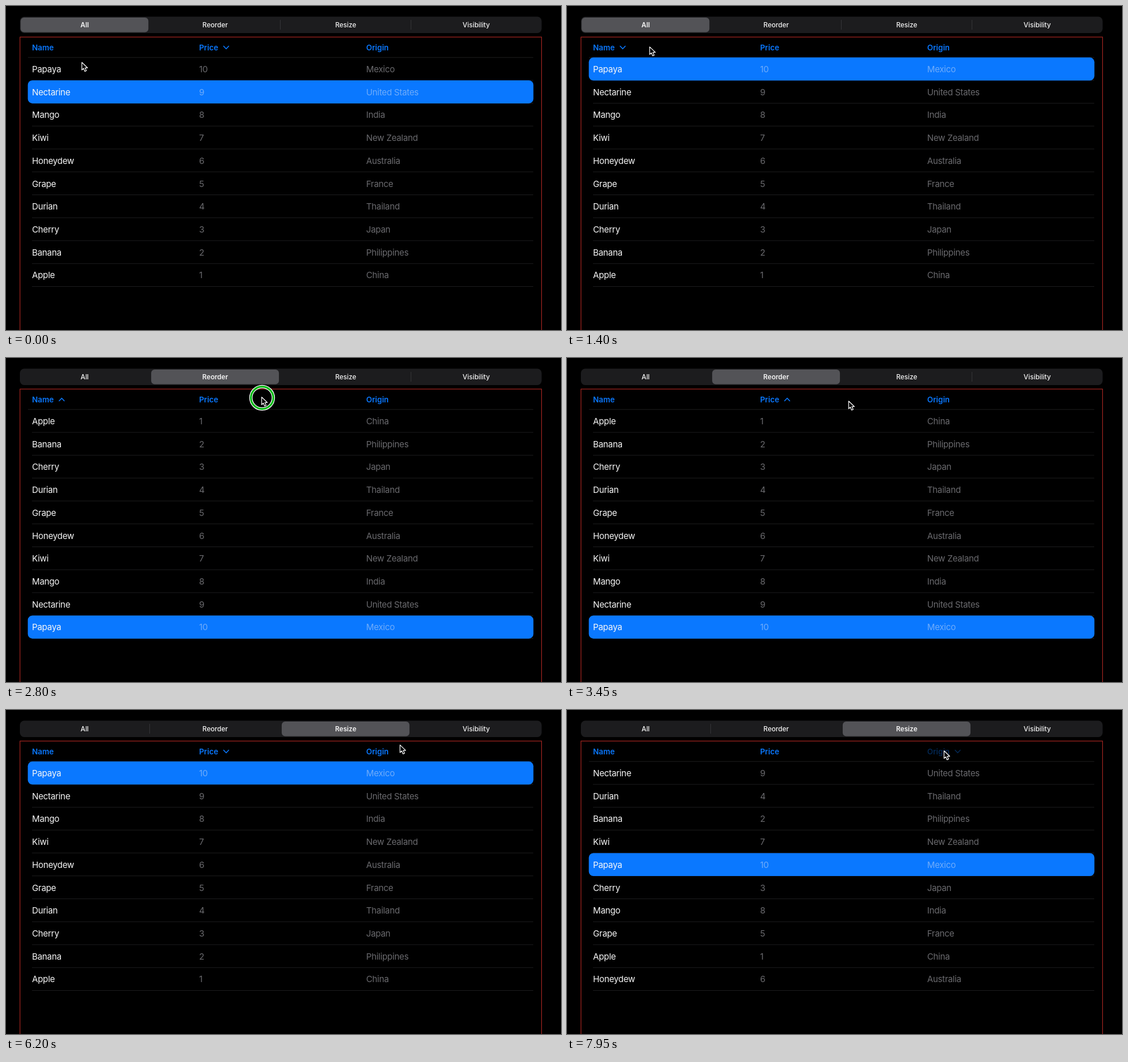
Animation, 960 px wide and 562 px high, one loop 8 s. Source, as an HTML page with a canvas:

```html
<!DOCTYPE html>
<html lang="en">
<head>
<meta charset="utf-8">
<title>Sortable table</title>
<style>
  html, body { margin: 0; width: 100%; height: 100%; overflow: hidden; background: #000; }
  canvas { display: block; width: 960px; height: 562px; }
</style>
</head>
<body>
<canvas id="stage" width="960" height="562"></canvas>
<script>
const ctx = document.getElementById('stage').getContext('2d');
const LOOP = 8000, PRESS = 150, FADE = 250;
const BLUE = '#0a78ff';
const FONT = 'Inter, Roboto, sans-serif';
const TOP = 89.7, ROW = 39.72, TAB = 225.8;

const tabs = ['All', 'Reorder', 'Resize', 'Visibility'];
const columns = ['Name', 'Price', 'Origin'];
const columnX = i => 45 + 289 * i;
const tabX = i => 136 + TAB * i;

// In order of name; the price is the rank
const origins = {
  Apple: 'China', Banana: 'Philippines', Cherry: 'Japan', Durian: 'Thailand',
  Grape: 'France', Honeydew: 'Australia', Kiwi: 'New Zealand', Mango: 'India',
  Nectarine: 'United States', Papaya: 'Mexico',
};
const fruits = Object.entries(origins).map(([name, origin], i) => [name, i + 1, origin]);

// The pointer's stops; those with an action are clicks
const stops = [
  { at: 150, x: 131, y: 97, select: 'Papaya' },
  { at: 850, x: 141, y: 71, sort: 0 },
  { at: 1500, x: 143, y: 70, sort: 0 },
  { at: 2250, x: tabX(1), y: 38, tab: 1 },
  { at: 2750, x: 442, y: 67, sort: 1 },
  { at: 3450, x: 487, y: 74 },
  { at: 3950, x: 497, y: 68, hold: 1 },
  { at: 5000, x: 538, y: 69, sort: 1 },
  { at: 5800, x: tabX(2), y: 33, tab: 2 },
  { at: 6350, x: 724, y: 72, sort: 2 },
  { at: 6750, x: 727, y: 76 },
  { at: 7700, x: 652, y: 70, hold: 2 },
];
const isClick = stop => Object.keys(stop).length > 3;

function smooth(v) {
  v = Math.max(0, Math.min(1, v));
  return v * v * (3 - 2 * v);
}

// Replays every stop up to time t
function stateAt(t) {
  const state = { ...stops[0], sort: 1, descending: true, selected: 'Nectarine', tab: 0 };
  let left = 0;
  for (const stop of stops) {
    const travel = smooth((t - left) / (stop.at - left));
    state.x += (stop.x - state.x) * travel;
    state.y += (stop.y - state.y) * travel;
    if (t < stop.at) break;
    left = stop.at + (isClick(stop) ? PRESS : 0);
    state.pressed = t < left;
    if (state.pressed) break;

    if (t < left + FADE) state.dimmed = stop.sort ?? stop.hold;
    if (stop.select) state.selected = stop.select;
    if (stop.tab) state.tab += (stop.tab - state.tab) * smooth((t - left) / FADE);
    if (stop.sort !== undefined) {
      if (stop.sort === state.sort) state.descending = !state.descending;
      state.sort = stop.sort;
    }
  }
  return state;
}

function text(string, x, y, size, weight, color, spacing = 0, align = 'left') {
  ctx.font = `${weight} ${size}px ${FONT}`;
  ctx.letterSpacing = spacing + 'px';
  ctx.textAlign = align;
  ctx.fillStyle = color;
  ctx.fillText(string, x, y);
  return ctx.measureText(string).width;
}

function box(x, y, w, h, r, color) {
  ctx.fillStyle = color;
  ctx.beginPath();
  ctx.roundRect(x, y, w, h, r);
  ctx.fill();
}

function stroke(color, width) {
  ctx.strokeStyle = color;
  ctx.lineWidth = width;
  ctx.lineCap = ctx.lineJoin = 'round';
  ctx.stroke();
}

function drawTabs(position) {
  box(24, 18.5, 902.5, 28.5, 7.5, '#1c1c1e');
  for (let i = 1; i < tabs.length; i++) {
    if (Math.abs(i - 0.5 - position) > 0.6) box(Math.floor(23 + TAB * i), 24, 1, 17, 0, '#343437');
  }
  box(25.3 + TAB * position, 20, 221, 25.5, 6, '#535357');
  tabs.forEach((label, i) => {
    const weight = Math.round(position) === i ? 600 : 500;
    text(label, tabX(i), 37, 11.6, weight, '#f4f4f4', 0, 'center');
  });
}

function drawHeader({ sort, descending, dimmed }) {
  columns.forEach((title, i) => {
    ctx.globalAlpha = dimmed === i ? 0.32 : 1;
    const end = columnX(i) + text(title, columnX(i), 76.6, 13.3, 600, BLUE);
    if (sort === i) {
      const dip = descending ? 2.3 : -2.3;
      ctx.beginPath();
      ctx.moveTo(end + 9.5, 72 - dip);
      ctx.lineTo(end + 13.8, 72 + dip);
      ctx.lineTo(end + 18.1, 72 - dip);
      stroke(BLUE, 1.6);
    }
    ctx.globalAlpha = 1;
  });
}

function drawRows({ sort, descending, selected }) {
  const rows = [...fruits].sort((a, b) => (a[sort] < b[sort] ? -1 : 1));
  if (descending) rows.reverse();
  for (let i = 0; i <= rows.length; i++) {
    const x = i ? 45 : 38;
    box(x, TOP + ROW * i - 1, 912 - x, 1, 0, '#1c1c1e');
  }
  const active = rows.findIndex(row => row[0] === selected);
  box(37.7, TOP + ROW * active - 0.4, 874.6, ROW + 0.2, 8, BLUE);
  rows.forEach((row, i) => row.forEach((value, c) => {
    const color = c ? 'rgba(235,235,245,.45)' : '#f7f7f7';
    text(value, columnX(c), 115 + ROW * i, 14.9, 400, color, -0.28);
  }));
}

function drawPointer({ x, y, pressed }) {
  if (pressed) {
    ctx.beginPath();
    ctx.arc(x + 1, y + 2, 19.4, 0, Math.PI * 2);
    stroke('#fff', 5.6);
    stroke('#00b810', 3.2);
  }
  const arrow = new Path2D('M0 0v13.2l3-2.8 2.2 5.2 2.6-1.1-2.2-5h4.2z');
  ctx.save();
  ctx.translate(x + 0.2, y + 0.8);
  ctx.fillStyle = '#000';
  ctx.fill(arrow);
  ctx.strokeStyle = '#fff';
  ctx.lineWidth = 1.2;
  ctx.stroke(arrow);
  ctx.restore();
}

function draw(t) {
  const state = stateAt(t);
  ctx.clearRect(0, 0, 960, 562);
  drawTabs(state.tab);
  ctx.beginPath();
  ctx.rect(24.2, 53.8, 902.2, 520);
  stroke('#a0241f', 1.2);
  drawHeader(state);
  drawRows(state);
  drawPointer(state);
}

const start = performance.now();
function tick() {
  draw((performance.now() - start) % LOOP);
  requestAnimationFrame(tick);
}
tick();
</script>
</body>
</html>
```
